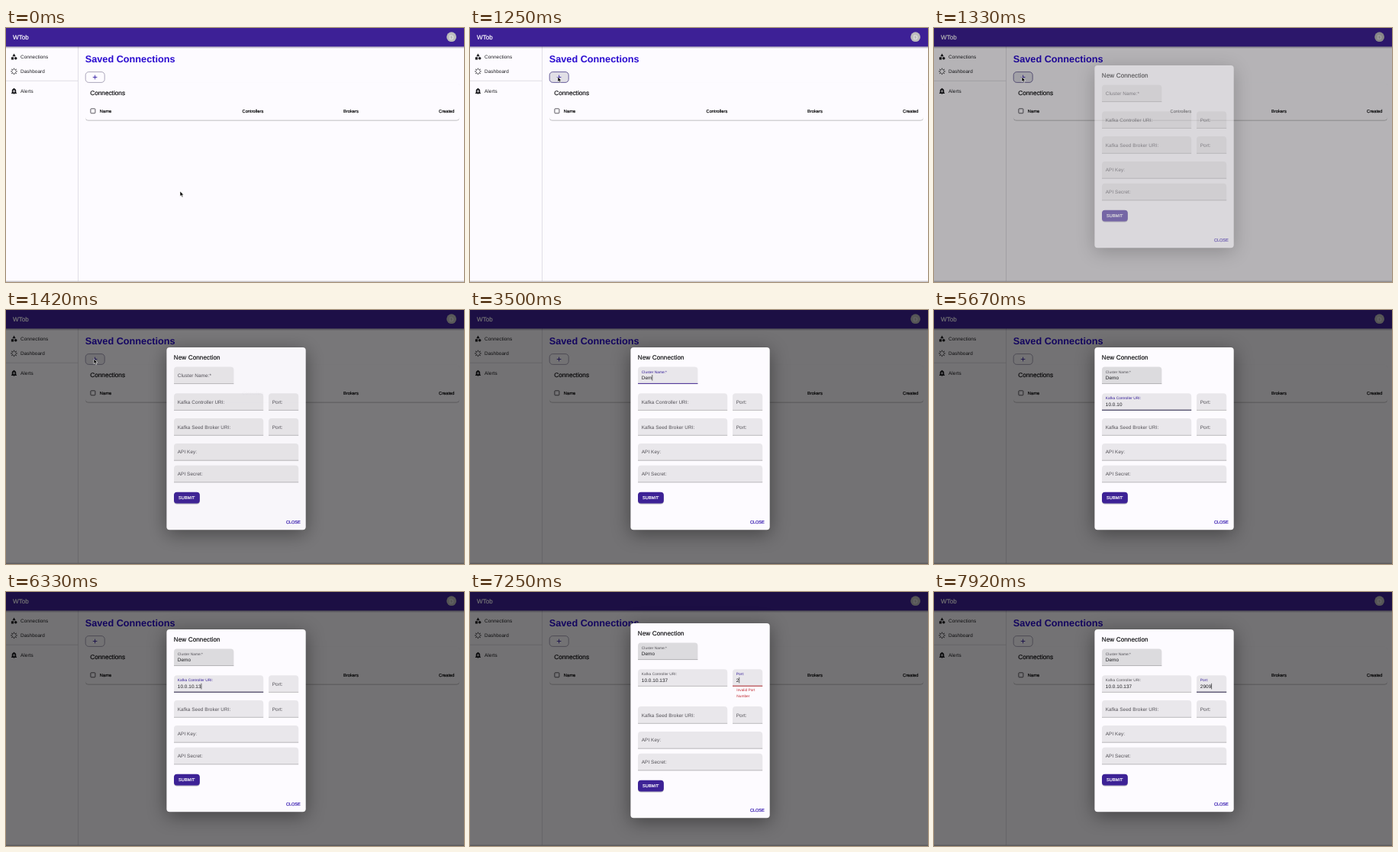
An HTML page for the animation above (8000 ms loop, 600x333 px).

```html
<!DOCTYPE html>
<html lang="en">
<head>
<meta charset="utf-8">
<title>Connections</title>
<style>
  html, body { margin: 0; width: 100%; height: 100%; overflow: hidden; background: #fdfbff; }
  svg { display: block; width: 600px; height: 333px; }
  text { font-family: "Liberation Sans", Arial, sans-serif; font-size: 6.4px; fill: #1b1b1f; text-rendering: geometricPrecision; white-space: pre; }
  .medium { stroke: currentColor; stroke-width: .2; }
  .body { letter-spacing: .06px; }
  #dialog { filter: drop-shadow(0 5px 12px rgba(0,0,0,.42)); }
</style>
</head>
<body>
<svg viewBox="0 0 600 333" id="stage">
  <defs>
    <linearGradient id="fall" x2="0" y2="1">
      <stop stop-color="#1b1040" stop-opacity=".42"/>
      <stop offset="1" stop-color="#1b1040" stop-opacity="0"/>
    </linearGradient>
    <filter id="soft" x="-5%" y="-20%" width="110%" height="150%">
      <feDropShadow dx="0" dy=".9" stdDeviation=".7" flood-opacity=".36"/>
    </filter>
  </defs>

  <rect width="600" height="333" fill="#fdfbff"/>
  <path d="M94.5 24V332" stroke="#dad8df" stroke-width=".8"/>
  <path d="M0 69.3H94.5" stroke="#dad8df" stroke-width=".8"/>
  <path d="M0 332.2H600" stroke="#aaa9ad" stroke-width=".9"/>
  <rect y="24" width="600" height="3.2" fill="url(#fall)"/>
  <rect width="600" height="24.3" fill="#3d2096"/>
  <text x="9" y="15" style="font-size:8.1px;fill:#fff;color:#fff" class="medium">WTob</text>
  <circle cx="583.6" cy="11.7" r="6.4" fill="#bdbdbd"/>
  <text x="583.6" y="14.6" text-anchor="middle" style="font-size:8px;fill:#f4f2f8">D</text>

  <g fill="#1b1b1f">
    <g transform="translate(5.7 32.8) scale(.4)">
      <path d="M12 2 6.5 11h11zM3 13.5h8v8H3z"/><circle cx="17.5" cy="17.5" r="4.5"/>
    </g>
    <g id="rays" transform="translate(10.5 56.9)" stroke="#1b1b1f" stroke-width=".95"></g>
    <g transform="translate(5.7 77.9) scale(.4)">
      <path d="M10 21a2 2 0 0 0 4 0zM18.9 16.8V11c0-3.25-2.25-5.97-5.3-6.7v-.7a1.6 1.6 0 0 0-3.2 0v.7C7.4 5 5.1 7.75 5.1 11v5.8L3 18.9V20h18v-1.1z"/>
      <path d="M12 8.5v8M8 12.5h8" stroke="#fdfbff" stroke-width="2"/>
    </g>
  </g>
  <text class="body" x="19" y="39.8">Connections</text>
  <text class="body" x="19" y="59">Dashboard</text>
  <text class="body" x="19" y="85">Alerts</text>

  <text x="103.8" y="44.6" style="font-size:12.7px;font-weight:700;fill:#2a0bd0">Saved Connections</text>
  <g filter="url(#soft)"><rect x="104" y="71.6" width="490" height="48.8" rx="4" fill="#fdfbff"/></g>
  <rect id="add" x="104.2" y="57.6" width="25" height="13.8" rx="4.2" stroke-width=".7"/>
  <path d="M116.6 61.7V67.3M113.8 64.5H119.4" stroke="#2f1aa0" stroke-width=".85"/>
  <text class="medium" x="110.2" y="87.8" style="font-size:8.25px">Connections</text>
  <rect x="110.9" y="105.8" width="6" height="6" rx=".8" fill="none" stroke="#4a4850" stroke-width=".9"/>
  <g id="heads"></g>

  <rect id="shade" width="600" height="333" fill="#000"/>
  <g id="dialog">
    <rect id="paper" x="210.4" y="49" width="182.3" rx="4" fill="#fdfbff"/>
    <text class="medium" x="219.8" y="65" style="font-size:8.1px;letter-spacing:.11px">New Connection</text>
    <g id="upper"></g>
    <g id="lower">
      <rect x="220" y="238.8" width="33.8" height="14.6" rx="4" fill="#3d2096" filter="url(#soft)"/>
      <text class="medium" x="226" y="248.1" style="font-size:5.6px;letter-spacing:.06px;fill:#fff;color:#fff">SUBMIT</text>
      <text class="medium" x="367" y="279.5" style="font-size:5.5px;fill:#3013ae;color:#3013ae">CLOSE</text>
    </g>
  </g>
  <path id="arrow" d="M0 0V6.6L1.6 5.2 2.7 7.7 3.9 7.2 2.8 4.8H4.8Z" fill="#000" stroke="#fff" stroke-width=".6"/>
  <path id="beam" d="M-1.5-4Q0-4 0-3 0-4 1.5-4M0-3V3M-1.5 4Q0 4 0 3 0 4 1.5 4" fill="none" stroke="#111" stroke-width=".7"/>
</svg>
<script>
const LOOP = 8000, SHIFT = 200;
const byId = id => document.getElementById(id);

function add(parent, tag, attrs = {}, text = '') {
  const el = document.createElementNS('http://www.w3.org/2000/svg', tag);
  set(el, attrs);
  el.textContent = text;
  parent.append(el);
  return el;
}
function set(el, attrs) {
  for (const key in attrs) el.setAttribute(key, attrs[key]);
}

// Timing curve with control points (x1, 0) and (x2, 1), solved by bisection.
const curve = (x1, x2) => p => {
  let low = 0, high = 1, s = .5;
  for (let i = 0; i < 20; i++) {
    const x = 3 * x1 * s * (1 - s) ** 2 + 3 * x2 * s * s * (1 - s) + s ** 3;
    if (x < p) low = s; else high = s;
    s = (low + high) / 2;
  }
  return s * s * (3 - 2 * s);
};
const easeOut = curve(0, .2), easeInOut = curve(.4, .2), glide = curve(.33, .5);
const ramp = (t, from, span, ease = easeOut) => {
  const p = (t - from) / span;
  return p <= 0 ? 0 : p >= 1 ? 1 : ease(p);
};
const pulse = (t, [on, off]) => ramp(t, on, SHIFT) - ramp(t, off, SHIFT);
const within = (t, [on, off]) => t >= on && t < off;
const mix = (a, b, p) => `rgb(${a.map((v, i) => Math.round(v + (b[i] - v) * p))})`;

for (let i = 0; i < 8; i++) add(byId('rays'), 'path', { d: 'M0-2.2V-4.2', transform: `rotate(${i * 45})` });
for (const [label, x] of [['Name', 122.8], ['Controllers', 309.5], ['Brokers', 442], ['Created', 567]])
  add(byId('heads'), 'text', { class: 'medium', x, y: 111.2, style: 'font-size:5.7px;letter-spacing:.03px' }, label);

const PURPLE = [59, 30, 146], INK = [30, 26, 69], RED = [190, 38, 44], GREY = [80, 78, 84];
const typing = (word, times) => times.map((at, i) => [at, word.slice(0, i + 1)]);

const fields = [
  { label: 'Cluster Name:*', x: 220, y: 74.4, w: 78.4, line: PURPLE, focus: [2250, 3830], hover: 2150,
    keys: typing('Demo', [2500, 2750, 3500, 3670]) },
  { label: 'Kafka Controller URI:', x: 220, y: 109.2, w: 117.2, line: INK, focus: [3830, 6920],
    keys: typing('10.0.10.137', [4080, 4250, 4500, 4670, 4830, 5000, 5170, 6000, 6170, 6250, 6420]),
    errors: [[4500, 4670], [4830, 5000], [6000, 6170]], help: ['Invalid URI'] },
  { label: 'Port:', x: 344, y: 109.2, w: 39.2, line: INK, focus: [6920, 9e9],
    keys: typing('2909', [7080, 7420, 7580, 7750]),
    errors: [[7080, 7750]], help: ['Invalid Port', 'Number'] },
  { label: 'Kafka Seed Broker URI:', x: 220, y: 142.1, w: 117.2, low: true },
  { label: 'Port:', x: 344, y: 142.1, w: 39.2, low: true },
  { label: 'API Key:', x: 220, y: 175, w: 163.2, low: true },
  { label: 'API Secret:', x: 220, y: 203.7, w: 163.2, low: true },
];

for (const f of fields) {
  const g = add(byId(f.low ? 'lower' : 'upper'), 'g', { transform: `translate(${f.x} ${f.y})` });
  f.box = add(g, 'path', { d: `M0 22.4V4Q0 0 4 0H${f.w - 4}Q${f.w} 0 ${f.w} 4V22.4Z`, 'fill-opacity': .08 });
  add(g, 'path', { d: `M0 22.2H${f.w}`, stroke: '#000', 'stroke-opacity': .46, 'stroke-width': .5 });
  f.tag = add(g, 'text', { class: 'body', transform: 'translate(4.8 13.4)' }, f.label);
  f.tag.style.fill = mix(GREY, GREY, 0);
  if (!f.keys) continue;
  f.bar = add(g, 'path', { d: `M${-f.w / 2} 0H${f.w / 2}`, 'stroke-width': .9 });
  f.value = add(g, 'text', { class: 'body', x: 4.8, y: 16.8 });
  f.caret = add(g, 'path', { d: 'M0 10.6V18.2', stroke: '#111', 'stroke-width': .6 });
  f.notes = (f.help || []).map((line, i) =>
    add(g, 'text', { x: 5.3, y: 28.8 + 8 * i, style: 'font-size:4.8px;fill:#c0272d' }, line));
}

// Draws one editable field and returns the extra height its message needs.
function drawField(f, t) {
  const lift = ramp(t, f.focus[0], SHIFT), active = pulse(t, f.focus);
  const typed = f.keys.filter(([at]) => at <= t);
  const errors = f.errors || [];
  const wrong = errors.some(span => within(t, span));
  const redness = Math.max(0, ...errors.map(span => pulse(t, span)));
  const hovered = f.hover ? ramp(t, f.hover, SHIFT) * (1 - active) : 0;

  set(f.box, { 'fill-opacity': .08 + .05 * hovered });
  set(f.tag, { transform: `translate(4.8 ${13.4 - 5.3 * lift}) scale(${1 - .25 * lift})` });
  f.tag.style.fill = mix(GREY, [48, 25, 150], active);
  set(f.bar, { transform: `translate(${f.w / 2} 22) scale(${active} 1)`, stroke: mix(f.line, RED, redness),
    visibility: active > .001 ? 'visible' : 'hidden' });

  const [last, text] = typed.at(-1) || [f.focus[0], ''];
  f.value.textContent = text;
  const blink = Math.floor((t - last) / 500) % 2 === 0;
  const width = text ? f.value.getComputedTextLength() : 0;
  set(f.caret, { transform: `translate(${5.1 + width} 0)`,
    visibility: within(t, f.focus) && blink ? 'visible' : 'hidden' });
  for (const note of f.notes) set(note, { visibility: wrong ? 'visible' : 'hidden' });
  return wrong ? 8 * f.notes.length : 0;
}

function drawCursor(t) {
  const toButton = ramp(t, 200, 680, glide), toField = ramp(t, 1850, 400, glide);
  const x = 228 - 113 * toButton + 137 * toField;
  const y = 214 - 150 * toButton + 23 * toField;
  const overField = toField > 0 && x > 220 && y > 74.4;
  const spot = `translate(${x} ${y})`;
  set(byId('arrow'), { transform: spot, visibility: t < 2500 && !overField ? 'visible' : 'hidden' });
  set(byId('beam'), { transform: spot, visibility: t < 2500 && overField ? 'visible' : 'hidden' });
}

function draw(t) {
  const hover = ramp(t, 780, 250, easeInOut) - ramp(t, 1265, 250, easeInOut);
  const press = ramp(t, 1080, 250) - ramp(t, 1265, 565, easeInOut);
  set(byId('add'), {
    fill: mix([253, 251, 255], [222, 220, 228], .35 * hover + .6 * press),
    stroke: mix([138, 133, 158], [50, 36, 120], hover),
  });

  const open = ramp(t, 1250, 225, easeInOut);
  set(byId('shade'), { opacity: .545 * open });
  set(byId('dialog'), { opacity: open, visibility: open > 0 ? 'visible' : 'hidden' });

  const grow = Math.max(...fields.filter(f => f.keys).map(f => drawField(f, t)));
  set(byId('dialog'), { transform: `translate(0 ${-grow / 2})` });
  set(byId('lower'), { transform: `translate(0 ${grow})` });
  set(byId('paper'), { height: 239.3 + grow });
  drawCursor(t);
}

const start = performance.now();
function tick() {
  draw((performance.now() - start) % LOOP);
  requestAnimationFrame(tick);
}
tick();
</script>
</body>
</html>
```
